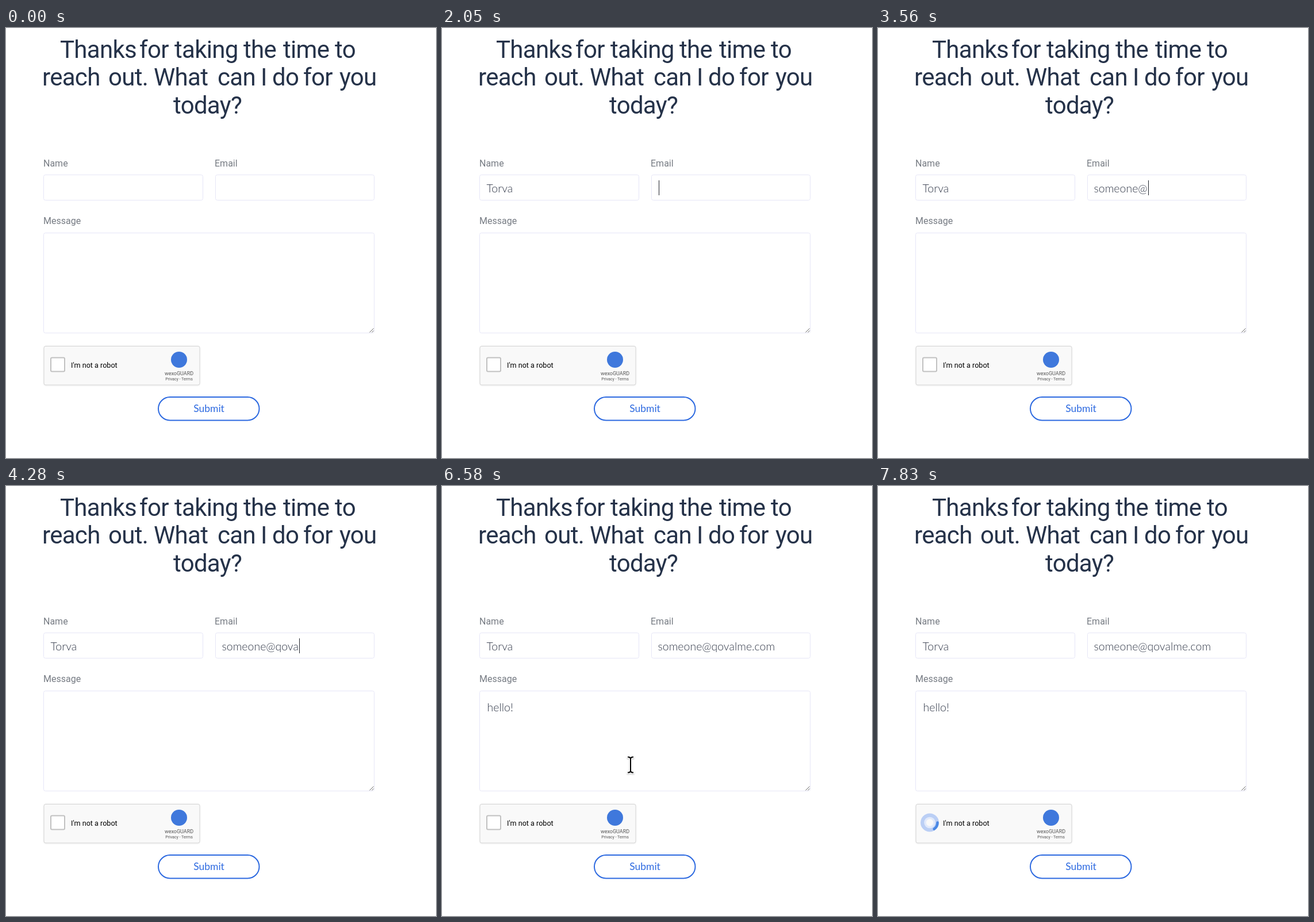
Write an HTML page that moves like this. It is 748 by 748 pixels and loops after 8000 ms.

```html
<!DOCTYPE html>
<html lang="en">
<head>
<meta charset="utf-8">
<title>Contact form</title>
<style>
html, body { margin: 0; width: 100%; height: 100%; overflow: hidden; background: #fff; }
svg { display: block; width: 748px; height: 748px; }
text { font-family: Roboto, sans-serif; white-space: pre; }
.head { font-size: 42px; letter-spacing: -.7px; fill: #253249; }
.label { font-size: 16px; fill: #767b83; }
.typed { font-family: Lato, sans-serif; font-weight: 300; font-size: 19.5px; fill: #343b4b; }
.field { fill: #fff; stroke: #e6e6f7; }
.small { fill: #555; text-anchor: middle; }
.submit { font-family: Lato, sans-serif; font-size: 17.5px; fill: #2c69e0; text-anchor: middle; }
</style>
</head>
<body>
<svg viewBox="0 0 748 748">
  <defs>
    <filter id="soft" x="-50%" y="-50%" width="200%" height="200%">
      <feDropShadow dx="0" dy="1" stdDeviation="1" flood-opacity=".3"/>
    </filter>
    <filter id="lift" x="-5%" y="-10%" width="110%" height="120%">
      <feDropShadow dx="0" dy="0.5" stdDeviation="1" flood-opacity=".1"/>
    </filter>
  </defs>
  <rect width="748" height="748" fill="#fff"/>
  <g id="head" class="head"></g>

  <text class="label" x="65" y="240.5">Name</text>
  <text class="label" x="363" y="240.5">Email</text>
  <text class="label" x="65" y="341">Message</text>
  <rect class="field" x="65.5" y="255.5" width="277" height="44" rx="3"/>
  <rect class="field" x="364.5" y="255.5" width="276" height="44" rx="3"/>
  <rect class="field" x="65.5" y="356.5" width="575" height="174" rx="3"/>
  <path d="M632.5 529.5l7-7M636.5 529.5l3-3" stroke="#666"/>

  <text id="name" class="typed" x="77.5" y="286"></text>
  <text id="email" class="typed" x="375.5" y="286"></text>
  <text id="message" class="typed" x="78.5" y="392"></text>
  <rect id="caret" width="1" height="26" fill="#20242c"/>

  <rect x="66" y="553.5" width="271" height="67.5" rx="3" fill="#f9f9f9" stroke="#d3d3d3" filter="url(#lift)"/>
  <rect id="box" x="78" y="573.5" width="24" height="24" rx="2" stroke="#c1c1c1" stroke-width="2"/>
  <g id="spinner">
    <circle r="16" fill="#bbcff5"/>
    <circle r="9.8" fill="#e2eafb"/>
    <circle r="6.2" fill="#f9f9f9"/>
    <path id="arc" d="M13.5 0A13.5 13.5 0 0 1 7.6 11.2" fill="none" stroke="#4a88e4" stroke-width="4.5" stroke-linecap="round"/>
  </g>
  <text x="113" y="591" font-size="12.6">I'm not a robot</text>
  <circle cx="301" cy="577" r="14" fill="#3f78dc"/>
  <text class="small" x="301" y="603.5" font-size="9">wexoGUARD</text>
  <text class="small" x="301" y="613" font-size="7">Privacy - Terms</text>

  <rect x="265" y="642" width="175.5" height="40.5" rx="20.25" fill="#fff" stroke="#2c69e0" stroke-width="2"/>
  <text class="submit" x="353" y="668">Submit</text>

  <g id="beam" fill="none" stroke-linecap="square" filter="url(#soft)">
    <path id="beamEdge" stroke="#fff" stroke-width="4.5"/>
    <path id="beamCore" stroke="#000" stroke-width="2"/>
  </g>
  <path id="arrow" d="M0 0V26.5L6 21L11 33L16 31L11 19.3H19Z" fill="#000" stroke="#fff" stroke-width="1.6" filter="url(#soft)"/>
</svg>
<script>
const LOOP = 8000;
const $ = id => document.getElementById(id);
const show = (el, on) => el.setAttribute("visibility", on ? "visible" : "hidden");
const move = (el, x, y, s = 1) => el.setAttribute("transform", `translate(${x} ${y}) scale(${s})`);

// Value of the latest step [time, value] that has been reached
const at = (steps, t, start) => steps.reduce((v, s) => t >= s[0] ? s[1] : v, start);

const heading = [
  [52, "Thanks for taking the time to", [94, 232, 293, 413, 482, 572]],
  [100, "reach out. What can I do for you", [63, 178, 257, 368, 443, 463, 517, 580]],
  [148.5, "today?", [291]]
];
for (const [y, line, xs] of heading) {
  line.split(" ").forEach((word, i) => {
    const el = document.createElementNS("http://www.w3.org/2000/svg", "text");
    el.setAttribute("x", xs[i]);
    el.setAttribute("y", y);
    el.textContent = word;
    $("head").append(el);
  });
}

// Letters typed so far in each field
const fields = {
  name: {
    text: "Torva", x: 78, y: 265,
    keys: [[790, 1], [960, 3], [1090, 5]]
  },
  email: {
    text: "someone@qovalme.com", x: 377, y: 265,
    keys: [[2450, 1], [2640, 2], [2810, 4], [2970, 5], [3300, 7], [3560, 8], [3820, 9],
      [4080, 11], [4280, 12], [4540, 13], [4740, 16], [4940, 19]]
  },
  message: {
    text: "hello!", x: 79, y: 371,
    keys: [[5390, 1], [5590, 2], [5920, 5], [6380, 6]]
  }
};
const focus = [[130, "name"], [1250, "email"], [1590, ""], [2050, "email"], [5130, "message"], [6580, ""]];
const pointer = [[6780, [128, 591]], [7040, [96, 584]], [7240, [80, 565]], [7500, [4, 384]], [7660, null]];
const spin = [[7500, [.6, -120]], [7660, [.85, -60]], [7830, [1, 0]]];

const beam = "M324 471.5Q328 471.5 328 475.5Q328 471.5 332 471.5M328 475V495M324 498.5Q328 498.5 328 494.5Q328 498.5 332 498.5";
$("beamEdge").setAttribute("d", beam);
$("beamCore").setAttribute("d", beam);

function draw(t) {
  for (const id in fields) {
    const f = fields[id];
    const typed = f.text.slice(0, at(f.keys, t, 0));
    if ($(id).textContent !== typed) $(id).textContent = typed;
  }

  const active = at(focus, t, "");
  show($("caret"), active);
  if (active) {
    const f = fields[active];
    const w = $(active).textContent ? $(active).getComputedTextLength() : 0;
    move($("caret"), Math.round(f.x + w), f.y);
  }

  show($("beam"), t >= 6580 && t < 6780);
  const tip = at(pointer, t, null);
  show($("arrow"), tip);
  if (tip) move($("arrow"), ...tip);

  const pressed = t >= 7040 && t < 7240;
  show($("box"), t < 7500);
  $("box").setAttribute("fill", pressed ? "#ebebeb" : "#fff");

  const turn = at(spin, t, null);
  show($("spinner"), turn);
  if (turn) {
    move($("spinner"), 90, 585.5, turn[0]);
    $("arc").setAttribute("transform", `rotate(${turn[1]})`);
  }
}

function tick() {
  draw(performance.now() % LOOP);
  requestAnimationFrame(tick);
}
tick();
</script>
</body>
</html>
```
